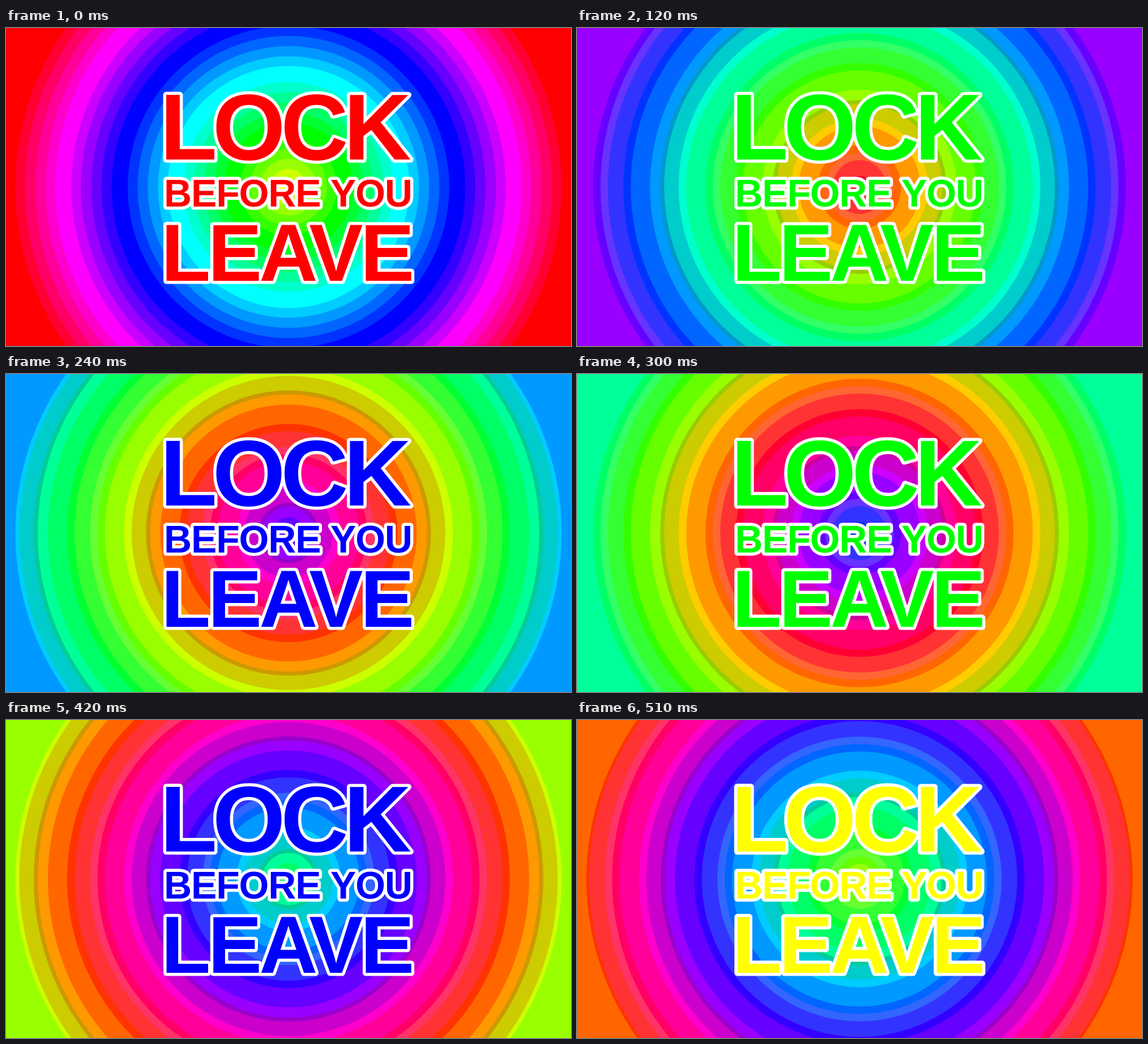
An HTML page with a canvas that plays this animation: 998 by 561 pixels, repeating every 0.54 s.

```html
<!DOCTYPE html>
<html lang="en">
<head>
<meta charset="utf-8">
<title>Lock before you leave</title>
<style>
  html, body { margin: 0; width: 100%; height: 100%; overflow: hidden; background: #f00; }
  canvas { display: block; }
</style>
</head>
<body>
<canvas id="stage" width="998" height="561"></canvas>
<script>
const ctx = document.getElementById('stage').getContext('2d');
const W = 998, H = 561, CX = 499, CY = 280.5;
const STEP = 30, STEPS = 18;
const SPAN = 99.3;   // pixels of radius per 60 degrees of hue
const RIM = 482.5;   // everything beyond has one colour

// Colours from one primary to the next: [levels 0-5 of this, next, third channel; upper edge]
const PURE = [['500', 14.3], ['510', 32], ['520', 50], ['530', 68], ['540', 85.3], ['550', 113.7],
  ['450', 131], ['350', 149], ['250', 167], ['150', 184.5], ['050', 999]];
const SOFT = [['511', 14], ['521', 27], ['520', 40], ['530', 74], ['540', 87.5], ['440', 113],
  ['340', 120], ['350', 138], ['250', 172], ['150', 185], ['151', 999]];

const pick = (table, d) => table.find(band => d < band[1])[0];

function ringColor(r, step) {
  const u = (r - 298.5) / SPAN + 4 - step / 3 + 12;
  const sector = Math.floor(u / 2);
  const d = (u - 2 * sector) * SPAN;
  const mode = step % 3;
  let levels;
  if (mode === 2) {
    const [a, b, c] = pick(SOFT, 2 * SPAN - d);
    levels = [b, a, c];
  } else {
    levels = [...pick(mode ? SOFT : PURE, d)];
  }
  const rgb = [];
  levels.forEach((v, i) => { rgb[(sector + i) % 3] = v * 51; });
  return `rgb(${rgb})`;
}

function drawRings(step) {
  let last = ringColor(500, step);
  ctx.fillStyle = last;
  ctx.fillRect(0, 0, W, H);
  for (let r = RIM; r > 0; r -= 0.5) {
    const color = ringColor(r, step);
    if (color === last) continue;
    last = color;
    ctx.fillStyle = color;
    ctx.beginPath();
    ctx.arc(CX, CY, r, 0, 2 * Math.PI);
    ctx.fill();
  }
}

// Tracks a line so that its ink runs from left to right.
function makeLine(text, size, baseline, left, right) {
  const font = `bold ${size}px "Liberation Sans", Arial, sans-serif`;
  ctx.font = font;
  ctx.letterSpacing = '0px';
  const m = ctx.measureText(text);
  const ink = m.actualBoundingBoxLeft + m.actualBoundingBoxRight;
  const gap = (right - left - ink) / (text.length - 1);
  return { text, font, baseline, x: left + m.actualBoundingBoxLeft, spacing: gap + 'px' };
}

const lines = [
  makeLine('LOCK', 165.5, 232, 283, 714.5),
  makeLine('BEFORE YOU', 68, 314.5, 283, 714),
  makeLine('LEAVE', 143, 445.5, 283, 716)
];

function drawText(step) {
  ctx.lineJoin = 'round';
  ctx.lineWidth = 11;
  ctx.strokeStyle = '#fff';
  ctx.fillStyle = `hsl(${360 - step % 6 * 60}, 100%, 50%)`;
  for (const line of lines) {
    ctx.font = line.font;
    ctx.letterSpacing = line.spacing;
    ctx.strokeText(line.text, line.x, line.baseline);
    ctx.fillText(line.text, line.x, line.baseline);
  }
}

let shown = -1;
function tick() {
  const step = Math.floor(performance.now() / STEP) % STEPS;
  if (step !== shown) {
    shown = step;
    drawRings(step);
    drawText(step);
  }
  requestAnimationFrame(tick);
}
tick();
</script>
</body>
</html>
```
